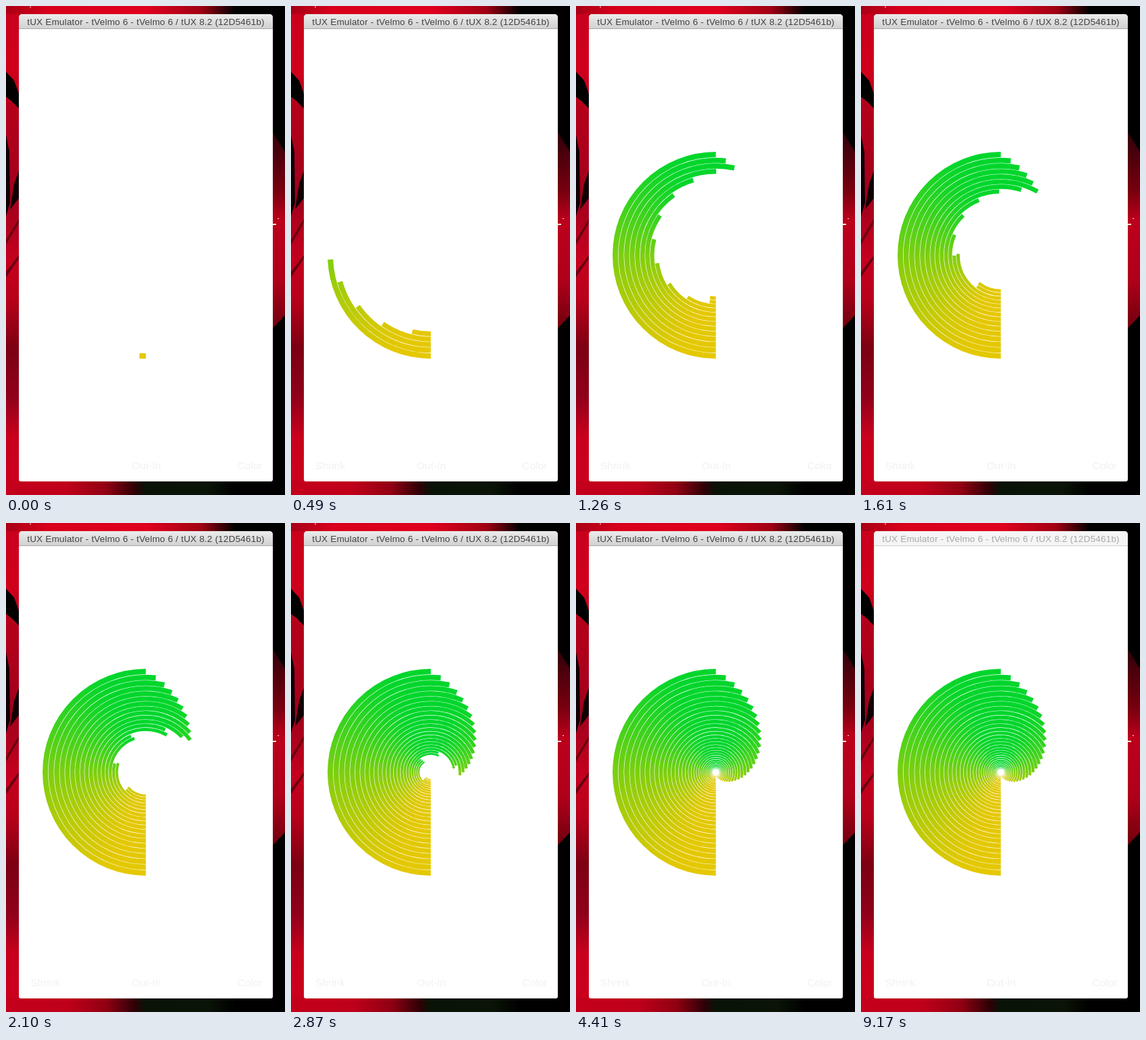
An HTML page with a canvas for the animation above (9.24 s loop, 412 px wide and 721 px high).

```html
<!DOCTYPE html>
<html lang="en">
<head>
<meta charset="utf-8">
<title>Arc spiral</title>
<style>
  html, body { margin: 0; width: 100%; height: 100%; overflow: hidden; background: #000; }
  body { position: relative; font-family: "Liberation Sans", Arial, sans-serif; }
  canvas { position: absolute; left: 0; top: 0; display: block; }
  div { position: absolute; white-space: pre; text-align: center; }
  #title { left: 19px; width: 375px; top: 12px; line-height: 23px; font-size: 13.5px; letter-spacing: .18px; color: #404040; }
  .label { top: 668px; width: 80px; line-height: 20px; font-size: 15.5px; color: #f1f1f1; }
</style>
</head>
<body>
<canvas id="stage" width="412" height="721"></canvas>
<div id="title">tUX Emulator - tVelmo 6 - tVelmo 6 / tUX 8.2 (12D5461b)</div>
<div class="label" id="shrink" style="left:18px">Shrink</div>
<div class="label" style="left:167px">Out-In</div>
<div class="label" style="left:320px">Color</div>
<script>
const ctx = document.getElementById('stage').getContext('2d');
const title = document.getElementById('title');
const shrink = document.getElementById('shrink');

const LOOP = 9240, STEP = 70, DONE = 4410, BLUR = 9170;
const CX = 206.5, CY = 367.5, COUNT = 31, GAP = 0.6;
const DURATION = 1050, UNIT = 105, LEAD = 42;

function linear(x0, y0, x1, y1, stops) {
  const g = ctx.createLinearGradient(x0, y0, x1, y1);
  stops.forEach(([at, color]) => g.addColorStop(at, color));
  return g;
}
const vertical = (y0, y1, ...stops) => linear(0, y0, 0, y1, stops);
const horizontal = (x0, x1, ...stops) => linear(x0, 0, x1, 0, stops);

// Each timer fires up to 10% late and takes along every timer already due.
function makeRings() {
  const rings = [];
  let outer = 152.5, fire = 0.2;
  for (let i = 0; i < COUNT; i++) {
    if (i > fire) fire = i * 1.099;
    const pitch = 0.87 + 0.26 * (30 - i);
    const width = pitch - GAP;
    rings.push({
      start: fire * UNIT - LEAD,
      radius: outer - width / 2,
      width,
      sweep: Math.PI * (1 + i / 30),
      color: vertical(CY - outer, CY + outer, [0, '#00d62c'], [0.04, '#00d62c'], [0.5, '#7ccf10'], [0.96, '#e4c800'], [1, '#e4c800'])
    });
    outer -= pitch;
  }
  return rings;
}
const rings = makeRings();

function shape(color, ...pts) {
  ctx.fillStyle = color;
  ctx.beginPath();
  for (let i = 0; i < pts.length; i += 2) ctx.lineTo(pts[i], pts[i + 1]);
  ctx.fill();
}

const leftRed = vertical(0, 721, [0, '#c8001c'], [0.13, '#d0001c'], [0.2, '#b4001a'],
  [0.4, '#a2001c'], [0.52, '#c4001e'], [0.6, '#b8001a'], [0.7, '#7c0012'],
  [0.8, '#90001a'], [0.88, '#c8001c'], [1, '#cc001c']);
const rightRed = vertical(186, 475, [0, '#30000a'], [0.3, '#78000f'], [0.45, '#bc001c'],
  [0.75, '#b0001a'], [1, '#70000e']);
const topRed = horizontal(0, 412, [0, '#a80016'], [0.15, '#d8001c'], [0.5, '#e0001e'],
  [0.7, '#a00014'], [0.82, '#000']);
const bottomRed = horizontal(0, 412, [0, '#c4001c'], [0.22, '#c0001a'], [0.36, '#900012'],
  [0.46, '#300006'], [0.5, '#081206'], [0.72, '#0a1406'], [0.82, '#000']);
const activeBar = vertical(12, 34, [0, '#ececec'], [1, '#d0d0d0']);

function drawBackdrop() {
  ctx.fillStyle = '#000';
  ctx.fillRect(0, 0, 412, 721);
  ctx.fillStyle = topRed;
  ctx.fillRect(0, 0, 412, 14);
  ctx.fillStyle = leftRed;
  ctx.fillRect(0, 12, 20, 690);
  ctx.fillStyle = bottomRed;
  ctx.fillRect(0, 700, 412, 21);
  shape('#000', 0, 97, 12, 110, 20, 132, 20, 152, 8, 140, 0, 134);
  shape('#100004', 0, 190, 5, 215, 6, 290, 0, 310);
  shape('#100004', 20, 240, 12, 262, 6, 300, 20, 282);
  shape('#6a0010', 0, 345, 20, 312, 20, 318, 0, 352);
  shape('#6a0010', 0, 392, 20, 366, 20, 371, 0, 400);
  shape(rightRed, 394, 186, 412, 215, 412, 456, 394, 475);
  ctx.fillStyle = '#f4e8d8';
  ctx.fillRect(394, 321, 5, 2);
  ctx.fillRect(401, 313, 2, 1);
  ctx.fillRect(35, 1, 2, 1);
}

function drawWindow(active) {
  ctx.save();
  ctx.beginPath();
  ctx.roundRect(19, 12, 375, 689, [5, 5, 3, 3]);
  ctx.clip();
  ctx.fillStyle = '#fff';
  ctx.fillRect(19, 12, 375, 689);
  ctx.fillStyle = active ? activeBar : '#f5f5f5';
  ctx.fillRect(19, 12, 375, 22);
  ctx.fillStyle = active ? '#aaa' : '#d0d0d0';
  ctx.fillRect(19, 33, 375, 1);
  ctx.restore();
}

function drawRings(t) {
  for (const r of rings) {
    const p = t >= DONE ? 1 : Math.min(1, (t - r.start) / DURATION);
    if (p <= 0) continue;
    ctx.strokeStyle = r.color;
    ctx.lineWidth = r.width;
    ctx.beginPath();
    ctx.arc(CX, CY, r.radius, Math.PI / 2, Math.PI / 2 + r.sweep * p);
    ctx.stroke();
  }
}

function frame(now) {
  const t = Math.floor((now % LOOP) / STEP) * STEP;
  const active = t < BLUR;
  drawBackdrop();
  drawWindow(active);
  drawRings(t);
  title.style.color = active ? '#404040' : '#a8a8a8';
  shrink.style.visibility = t < STEP ? 'hidden' : 'visible';
}

const begin = performance.now();
function tick() {
  frame(performance.now() - begin);
  requestAnimationFrame(tick);
}
tick();
</script>
</body>
</html>
```
